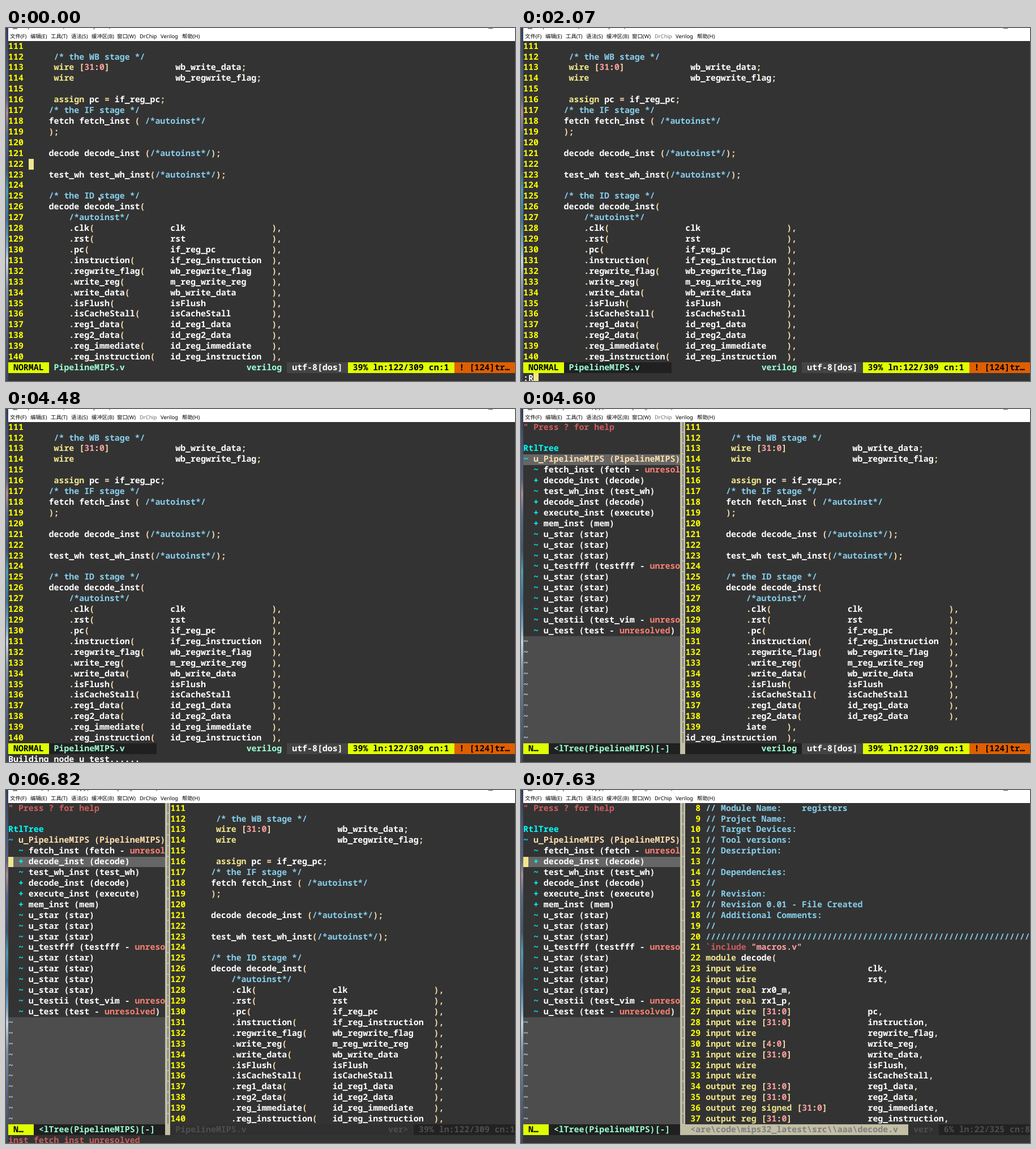
Animation of 899x623 px, one loop 8000 ms. Source, as an HTML page:

```html
<!DOCTYPE html>
<html lang="zh">
<head>
<meta charset="utf-8">
<title>RtlTree</title>
<style>
html, body { margin: 0; width: 100%; height: 100%; overflow: hidden; background: #333; }
#stage {
  position: absolute; left: 0; top: 0; width: 899px; height: 623px; overflow: hidden; background: #333; color: #fff;
  font: 600 14.917px "Noto Sans Mono", monospace; line-height: 18.914px;
  text-rendering: geometricPrecision; font-variant-ligatures: none;
}
#stage div { position: absolute; white-space: pre; }
#bar { left: 4px; top: 0; width: 895px; height: 23px; background: #fff; overflow: hidden;
  font: 400 9.4px "Noto Sans", "Noto Sans CJK SC", "Noto Sans CJK", sans-serif; color: #000; }
#bar div { line-height: 14px; top: 8px; }
#bar .title { top: -10px; left: 26px; font-size: 9.8px; }
#edge { left: 0; top: 0; width: 4px; height: 623px;
  background: linear-gradient(#35405a, #4b587a 12%, #59607c 20%, #a58a94 24%, #56698c 30%, #41566f 40%,
    #4d9ab0 46%, #3f6f96 54%, #7fa9c8 62%, #c3d3e0 66%, #7e90a8 74%, #566480 86%, #3c465c); }
.n { color: #ff0; } .c { color: #87ceeb; } .k { color: #f0e68c; } .d { color: #ffa0a0; }
.o { color: #ffdead; } .p { color: #cd5c5c; } .y { color: #0ff; } .u { color: #fa8072; } .t { color: #add8e6; }
</style>
</head>
<body>
<div id="stage">
  <div id="bar"></div>
  <div id="edge"></div>
</div>
<script>
(() => {
const CW = 8.95, RH = 18.914, X0 = 4, Y0 = 23, LOOP = 8000;
const stage = document.getElementById('stage'), bar = document.getElementById('bar');
const timed = [];

function add(parent, css, html = '') {
  const el = document.createElement('div');
  Object.assign(el.style, css);
  el.innerHTML = html;
  parent.append(el);
  return el;
}
const px = v => v + 'px';
const colX = c => px(X0 + c * CW), rowY = r => px(Y0 + r * RH);
const span = (cls, s) => `<span class="${cls}">${s}</span>`;
const during = (el, from, to) => (timed.push({ el, from, to }), el);

function cells(parent, col, row, w, h, bg) {
  return add(parent, { left: colX(col), top: rowY(row), width: px(w * CW), height: px(h * RH), background: bg, overflow: 'hidden' });
}
// Text sits slightly above the middle of each row.
function lines(box, list) {
  list.forEach((s, i) => add(box, { left: 0, top: px(i * RH - 0.4) }, s));
  return box;
}

// Verilog colouring
const TOKEN = /(\/\*.*?\*\/|\/\/.*)|("[^"]*")|(`\w+)|\b(wire|assign|module|input|output|reg|real|signed)\b|\b(\d+)\b|([^\w\s])/g;
const KINDS = ['c', 'd', 'p', 'k', 'd', 'o'];
const paint = s => s.replace(TOKEN, (m, ...g) => span(KINDS[g.slice(0, 6).findIndex(Boolean)], m));
const numbered = (list, first) => list.map((s, i) => span('n', String(first + i).padStart(3)) + ' ' + paint(s));

const port = ([a, b]) => (`        .${a}(`.padEnd(28) + b).padEnd(48) + '),';
const decl = ([a, b]) => a.padEnd(32) + b + ',';

const pipeline = numbered([
  '', '     /* the WB stage */',
  '     wire [31:0]'.padEnd(29) + 'wb_write_data;',
  '     wire'.padEnd(29) + 'wb_regwrite_flag;',
  '', '     assign pc = if_reg_pc;',
  '    /* the IF stage */', '    fetch fetch_inst ( /*autoinst*/', '    );', '',
  '    decode decode_inst (/*autoinst*/);', '',
  '    test_wh test_wh_inst(/*autoinst*/);', '',
  '    /* the ID stage */', '    decode decode_inst(', '        /*autoinst*/',
  ...[['clk', 'clk'], ['rst', 'rst'], ['pc', 'if_reg_pc'], ['instruction', 'if_reg_instruction'],
    ['regwrite_flag', 'wb_regwrite_flag'], ['write_reg', 'm_reg_write_reg'], ['write_data', 'wb_write_data'],
    ['isFlush', 'isFlush'], ['isCacheStall', 'isCacheStall'], ['reg1_data', 'id_reg1_data'],
    ['reg2_data', 'id_reg2_data'], ['reg_immediate', 'id_reg_immediate'],
    ['reg_instruction', 'id_reg_instruction']].map(port)
], 111);
const torn = [...pipeline.slice(0, 28), span('n', '139') + ' ' + paint('        iate    ),'), paint('id_reg_instruction  ),')];

const decode = numbered([
  '// Module Name:    registers', '// Project Name:', '// Target Devices:', '// Tool versions:',
  '// Description:', '//', '// Dependencies:', '//', '// Revision:',
  '// Revision 0.01 - File Created', '// Additional Comments:', '//', '/'.repeat(64),
  '`include "macros.v"', 'module decode(',
  ...[['input wire', 'clk'], ['input wire', 'rst']].map(decl),
  'input real rx0_m,', 'input real rx1_p,',
  ...[['input wire [31:0]', 'pc'], ['input wire [31:0]', 'instruction'], ['input wire', 'regwrite_flag'],
    ['input wire [4:0]', 'write_reg'], ['input wire [31:0]', 'write_data'], ['input wire', 'isFlush'],
    ['input wire', 'isCacheStall'], ['output reg [31:0]', 'reg1_data'], ['output reg [31:0]', 'reg2_data'],
    ['output reg signed [31:0]', 'reg_immediate'], ['output reg [31:0]', 'reg_instruction']].map(decl)
], 8);

const editor = (col, list, from, to) => during(lines(cells(stage, col, 0, 100 - col, 30, '#333'), list), from, to);
editor(0, pipeline, 0, 4600);
editor(32, torn, 4600, 4720);
editor(32, pipeline, 4720, 7510);
editor(32, decode, 7510, LOOP);

// Tree pane
const tree = during(cells(stage, 0, 0, 32, 30, '#333'), 4600, LOOP);
add(tree, { left: 0, top: px(20 * RH), width: px(31 * CW), height: px(10 * RH), background: '#4d4d4d' });
const marked = add(tree, { left: 0, width: px(31 * CW), height: px(RH), background: '#666' });
const node = s => '  ' + span('y', s[0]) + s.slice(1).replace(/unres\w*/, m => span('u', m));
const star = '~ u_star (star)';
lines(tree, [
  span('p', '" Press ? for help'), '', span('y', 'RtlTree'),
  span('y', '~') + span('o', ' u_PipelineMIPS (PipelineMIPS)'),
  ...['~ fetch_inst (fetch - unresol', '+ decode_inst (decode)', '~ test_wh_inst (test_wh)',
    '+ decode_inst (decode)', '+ execute_inst (execute)', '+ mem_inst (mem)', star, star, star,
    '~ u_testfff (testfff - unreso', star, star, star, star,
    '~ u_testii (test_vim - unreso', '~ u_test (test - unresolved)'].map(node),
  ...Array(10).fill(span('t', '~'))
]);
const divider = add(tree, { left: px(31 * CW), top: 0, width: px(CW), height: px(30 * RH), background: '#c2bfa5' });
add(divider, { left: '3.5px', top: 0, width: '2px', height: '100%',
  background: `repeating-linear-gradient(#7f7f7f 0 17px, #c2bfa5 17px ${RH}px)` });

// Status line segments: [column, width, background, colour, text]
function statusLine(from, to, segments) {
  const line = during(add(stage, { left: 0, top: 0 }), from, to);
  for (const [col, w, bg, fg, text] of segments) {
    // cells() offsets from the stage corner, as does this zero-size layer
    lines(cells(line, col, 30, w, 1, bg), [text]).style.color = fg;
  }
}
const LIME = '#dfff00', MINT = '#9cffd3', DARK = '#202020', DIM = '#4e4e4e', BEIGE = '#c2bfa5';
const normal = [0, 8, LIME, '#000', ' NORMAL '];
const active = [
  [55, 12, '#444', '#fff', ' utf-8[dos] '],
  [67, 21, LIME, '#000', ' 39% ln:122/309 cn:1 '],
  [88, 12, '#df5f00', '#000', ' ! [124]tr… ']
];
const treeBar = [[0, 5, LIME, '#000', ' N…  '], [5, 26, DARK, MINT, ' &lt;lTree(PipelineMIPS)[-]'], [31, 1, BEIGE, '#000', '']];
const verilog = [47, 8, 'none', MINT, 'verilog'];
statusLine(0, 1520, [normal, [8, 39, '#333', MINT, ' PipelineMIPS.v'], verilog, ...active]);
statusLine(1520, 4600, [normal, [8, 21.3, DARK, MINT, ' PipelineMIPS.v'], verilog, ...active]);
statusLine(4600, 4720, [...treeBar, [32, 23, DARK, MINT, ' '.repeat(15) + 'verilog'], ...active]);
statusLine(4720, 7630, [...treeBar, [32, 48, '#303030', DIM, ' PipelineMIPS.v'.padEnd(43) + 'ver&gt;'],
  [80, 20, '#222', DIM, ' 39% ln:122/309 cn:1']]);
statusLine(7630, LOOP, [...treeBar, [31, 45, BEIGE, '#7f7f7f', '  &lt;are\\code\\mips32_latest\\src\\\\aaa\\decode.v'],
  [76, 6, '#303030', DIM, ' ver&gt;'], [82, 18, '#222', DIM, ' 6% ln:22/325 cn:8']]);

// Menu and the cut-off title bar
const menu = [[7, '文件(F)'], [43, '编辑(E)'], [79, '工具(T)'], [115, '语法(S)'], [151, '缓冲区(B)'],
  [196, '窗口(W)'], [236, 'DrChip'], [273, 'Verilog'], [311, '帮助(H)']]
  .map(([x, s]) => add(bar, { left: px(x - X0) }, s));
const drChip = menu[6];
[['PipelineMIPS.v (D:\\code\\mips\\src) - GVIM', 0, 4600],
  ['RtlTree(PipelineMIPS) [-] (D:\\code\\mips32_latest\\src) - GVIM', 4600, LOOP]].forEach(([s, a, b]) => {
  during(add(bar, {}, s), a, b).className = 'title';
});
add(bar, { left: '8px', top: 0, width: '8px', height: '2px', background: '#7d8a7d' });
add(bar, { left: '848px', top: 0, width: '8px', height: '1px', background: '#555' });

// Command line, cursor and pointer
const cmd = add(stage, { left: colX(0), top: px(Y0 + 31 * RH - 0.4) });
const cursor = add(stage, { width: px(CW), height: px(RH), background: '#f0e68c', color: '#556070' });
const pointer = add(stage, { left: '162px', top: '296px' },
  '<svg width="9" height="12" style="display:block"><path d="M1 1V9.5L3 7.7 4.5 11 6 10.3 4.6 7.2H7.2Z" fill="#fff" stroke="#111" stroke-width=".8"/></svg>');
during(pointer, 0, 1520);

const CURSOR = [[0, 4, 11], [650], [820, 4, 11], [1240], [1520, 1, 31], [2070, 2, 31], [2340, 4, 31], [2460, 6, 31],
  [2580, 8, 31], [3420], [4720, 0, 3], [5310], [5620, 0, 3], [5890, 0, 4], [6040], [6570, 0, 4], [6820, 0, 5],
  [7510], [7630, 0, 5]];
const building = s => `Building node ${s}......`;
const CMD = [[0, ''], [1520, ':'], [2070, ':R'], [2340, ':Rtl'], [2460, ':RtlTr'], [2580, ':RtlTree'],
  [3420, building('decode_inst')], [3830, building('execute_inst')], [4110, building('u_star')],
  [4480, building('u_test')], [4600, ''], [5890, 'inst fetch_inst unresolved'], [7510, '']];
const MARKED = [[0, 3], [5890, 4], [6820, 5]];
const at = (steps, t) => steps.filter(s => s[0] <= t).pop();

const begin = performance.now();
function draw() {
  const t = Math.max(0, performance.now() - begin) % LOOP;
  for (const { el, from, to } of timed) el.style.display = t >= from && t < to ? '' : 'none';
  drChip.style.color = t >= 1520 && t < 4720 ? '#6d6d6d' : '#000';
  marked.style.top = px(at(MARKED, t)[1] * RH);
  cmd.textContent = at(CMD, t)[1];
  cmd.className = t >= 5890 ? 'p' : '';
  const [, col, row] = at(CURSOR, t);
  cursor.style.display = row === undefined ? 'none' : '';
  if (row !== undefined) {
    cursor.style.left = colX(col);
    cursor.style.top = rowY(row);
    cursor.textContent = row === 3 ? '~' : '';
  }
  requestAnimationFrame(draw);
}
draw();
})();
</script>
</body>
</html>
```
